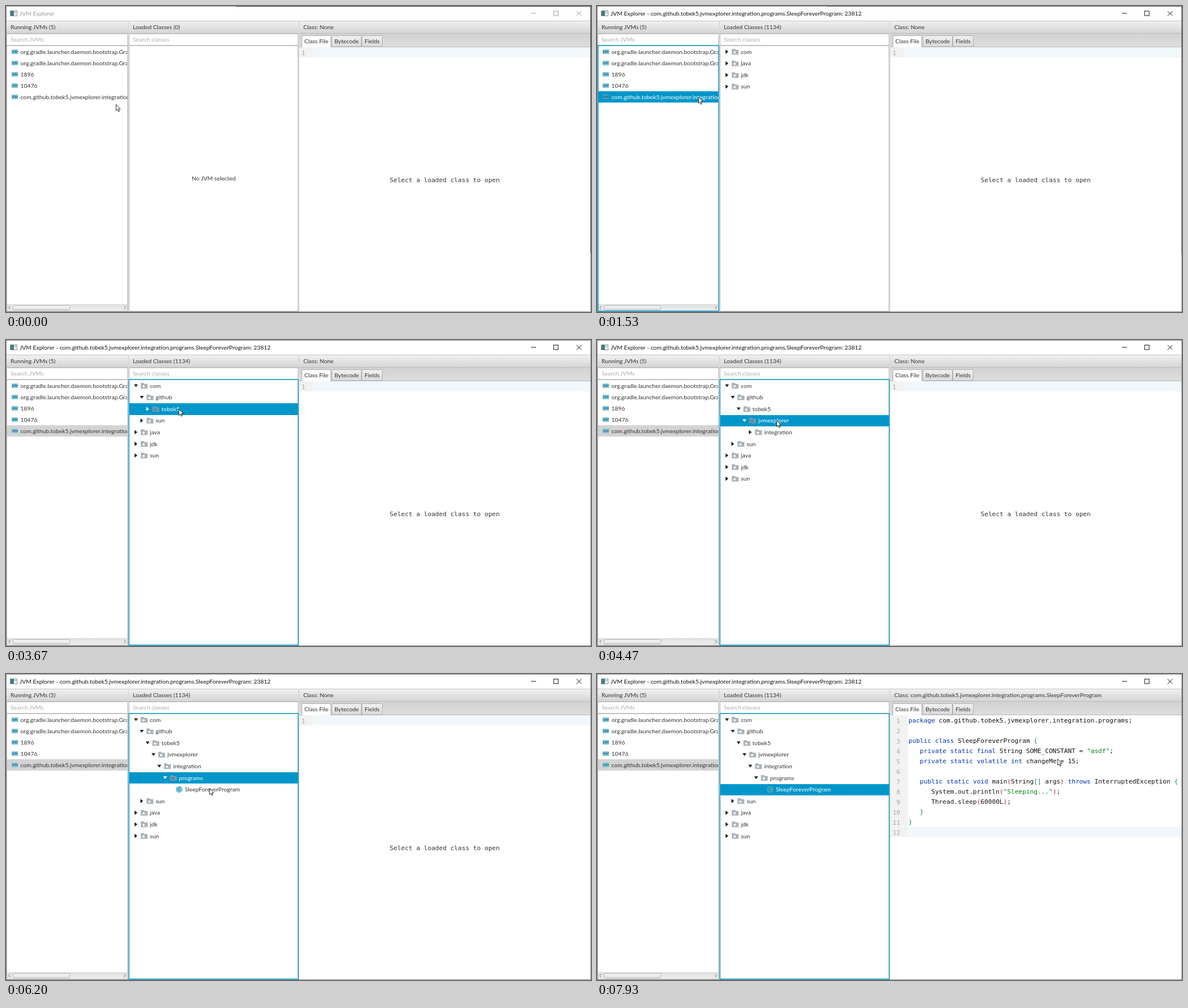
Write an HTML page with a canvas that moves like this. It is 1033 by 542 pixels and loops after 8000 ms.

```html
<!DOCTYPE html>
<html lang="en">
<head>
<meta charset="utf-8">
<title>JVM Explorer</title>
<style>
html, body { margin: 0; width: 100%; height: 100%; overflow: hidden; background: #fff; }
canvas { display: block; width: 1033px; height: 542px; }
</style>
</head>
<body>
<canvas id="stage"></canvas>
<script>
const W = 1033, H = 542, LOOP = 8000;
const canvas = document.getElementById('stage');
const ratio = window.devicePixelRatio || 1;
canvas.width = Math.round(W * ratio);
canvas.height = Math.round(H * ratio);
const ctx = canvas.getContext('2d');

const UI = '10.35px Lato, "Open Sans", sans-serif';
const MONO = '11.13px "DejaVu Sans Mono", "Noto Sans Mono", monospace';
const CHAR = 6.702;
const INK = '#333', ACCENT = '#0096c9', FOCUS = '#039ed3';

const PATH = ['com', 'github', 'tobek5', 'jvmexplorer', 'integration', 'programs', 'SleepForeverProgram'];
const CLASS = PATH.join('.');
const JVMS = [
  'org.gradle.launcher.daemon.bootstrap.GradleDaemon',
  'org.gradle.launcher.daemon.bootstrap.GradleDaemon',
  '1896', '10476', CLASS
];
const CODE = `package ${PATH.slice(0, 6).join('.')};

public class SleepForeverProgram {
   private static final String SOME_CONSTANT = "asdf";
   private static volatile int changeMe = 15;

   public static void main(String[] args) throws InterruptedException {
      System.out.println("Sleeping...");
      Thread.sleep(60000L);
   }
}
`.split('\n');
const TOKEN = /"[^"]*"|\b(?:package|public|class|private|static|final|volatile|int|void|throws)\b|[(){}[\]]/g;

const OPEN_AT = [2530, 3270, 3930, 4470, 5270, 6000];
const SELECT_AT = [2330, 3070, 3670, 4330, 5000, 5730, 6730];
const ACTIVE_AT = 600, TITLE_AT = 800, LOADED_AT = 1130, CODE_AT = 6930;

// start, end, number of steps, then the points passed on the way
const MOVES = [
  [130, 330, 4, [194, 174], [186, 178], [165, 160]],
  [1130, 1530, 7, [165, 160], [179, 161]],
  [1870, 2130, 5, [179, 161], [276, 82]],
  [2530, 2730, 4, [276, 82], [286, 102]],
  [3270, 3470, 4, [286, 102], [305, 122]],
  [4070, 4130, 2, [305, 122], [315, 140]],
  [4470, 4730, 5, [315, 140], [331, 164]],
  [5270, 5530, 4, [331, 164], [366, 177]],
  [6000, 6200, 4, [366, 177], [359, 202]],
  [6930, 7730, 13, [359, 202], [741, 161]],
  [7800, 7930, 3, [741, 161], [813, 150]]
];

const countPast = (times, t) => times.filter(v => t >= v).length;

function rect(x, y, w, h, fill) {
  ctx.fillStyle = fill;
  ctx.fillRect(x, y, w, h);
}

function frame(x, y, w, h, color, width = 1) {
  ctx.strokeStyle = color;
  ctx.lineWidth = width;
  ctx.strokeRect(x + width / 2, y + width / 2, w - width, h - width);
}

function shape(points, fill, stroke) {
  ctx.beginPath();
  points.forEach(([x, y]) => ctx.lineTo(x, y));
  ctx.closePath();
  if (fill) { ctx.fillStyle = fill; ctx.fill(); }
  if (stroke) { ctx.strokeStyle = stroke; ctx.stroke(); }
}

function line(color, ...points) {
  ctx.strokeStyle = color;
  ctx.lineWidth = 1;
  ctx.beginPath();
  points.forEach(([x, y], i) => i ? ctx.lineTo(x, y) : ctx.moveTo(x, y));
  ctx.stroke();
}

function pill(x, y, w, h, r, fill, stroke) {
  ctx.beginPath();
  ctx.roundRect(x, y, w, h, r);
  ctx.fillStyle = fill;
  ctx.fill();
  if (stroke) { ctx.strokeStyle = stroke; ctx.lineWidth = 1; ctx.stroke(); }
}

function text(str, x, y, color = INK, font = UI, align = 'left') {
  ctx.font = font;
  ctx.fillStyle = color;
  ctx.textAlign = align;
  ctx.fillText(str, x, y);
}

function shade(y0, y1, top, bottom) {
  const g = ctx.createLinearGradient(0, y0, 0, y1);
  g.addColorStop(0, top);
  g.addColorStop(1, bottom);
  return g;
}

function clipped(x, y, w, h, draw) {
  ctx.save();
  ctx.beginPath();
  ctx.rect(x, y, w, h);
  ctx.clip();
  draw();
  ctx.restore();
}

function titleBar(t) {
  const active = t >= ACTIVE_AT, ink = active ? '#111' : '#999';
  rect(0, 0, W, 26, '#fff');
  rect(7, 8, 13, 10, '#8a8f94');
  rect(8, 9, 11, 8, '#f4f6f7');
  rect(8, 9, 6, 8, '#3c7f83');
  rect(15, 10, 3, 3, '#b9c3c8');
  text('JVM Explorer' + (t >= TITLE_AT ? ` - ${CLASS}: 23812` : ''), 24, 17, ink);
  line(ink, [927, 13], [936, 13]);
  frame(966.5, 8.5, 9, 9, ink);
  line(ink, [1007.5, 9], [1016, 17.5]);
  line(ink, [1016, 9], [1007.5, 17.5]);
}

function header(x, w, label) {
  rect(x, 26, w, 23, shade(26, 48, '#f1f1f1', '#d5d5d5'));
  rect(x, 26, w, 1, '#c4c4c4');
  rect(x, 48, w, 1, '#bcbcbc');
  text(label, x + 7, 40.7);
}

function search(x, w, hint) {
  rect(x, 49, w, 21, '#fff');
  frame(x, 49, w, 21, '#c6c6c6');
  text(hint, x + 7, 63.3, '#acacac');
}

function listBox(x, w) {
  rect(x, 70, w, 471, '#fff');
  frame(x, 70, w, 471, '#bdbdbd');
}

function focusRing(x, w) {
  frame(x - .7, 69.3, w + 1.4, 471.7, FOCUS, 1.4);
}

function selectedRow(x, y, w, h) {
  rect(x, y, w, h, FOCUS);
  rect(x + 1, y + 1, w - 2, h - 2, ACCENT);
}

function jvmList(t) {
  const focused = t >= ACTIVE_AT && t < SELECT_AT[0];
  header(1, 214, 'Running JVMs (5)');
  search(1, 214, 'Search JVMs');
  listBox(1, 214);
  clipped(2, 71, 212, 457, () => JVMS.forEach((name, i) => {
    const y = 81 + i * 20, chosen = i === 4 && t >= ACTIVE_AT;
    if (chosen && focused) selectedRow(2, y - 10, 212, 20);
    else if (chosen) rect(2, y - 10, 212, 20, '#d3d3d3');
    rect(10, y - 4, 11, 8, chosen && focused ? '#3fa3c4' : '#79c7de');
    text('JVM', 15.5, y + 2, '#2d5968', 'bold 5px Lato, sans-serif', 'center');
    text(name, 25.5, y + 3.7, chosen && focused ? '#fff' : INK);
  }));
  rect(2, 528, 212, 12, shade(528, 540, '#dedede', '#efefef'));
  pill(12.5, 530.5, 100, 8, 2, shade(530, 539, '#fafafa', '#dcdcdc'), '#b2b2b2');
  line('#666', [7.5, 531.5], [4.5, 534.5], [7.5, 537.5]);
  line('#666', [208.5, 531.5], [211.5, 534.5], [208.5, 537.5]);
  if (focused) focusRing(2, 213);
}

function treeRows(open) {
  const rows = PATH.slice(0, open + 1).map((name, depth) =>
    ({ name, depth, open: depth < open, leaf: depth === PATH.length - 1 }));
  if (open) rows.push({ name: 'sun', depth: 1 });
  return rows.concat(['java', 'jdk', 'sun'].map(name => ({ name, depth: 0 })));
}

function folder(x, y, chosen) {
  const color = chosen ? '#6c9aae' : '#a9b3ba';
  shape([[x, y - 5], [x + 5, y - 5], [x + 6.5, y - 3.2], [x + 12, y - 3.2], [x + 12, y + 5], [x, y + 5]], color);
  ctx.beginPath();
  ctx.arc(x + 5, y + 1, 2, 0, 7);
  ctx.fillStyle = chosen ? '#3c87a6' : '#fff';
  ctx.fill();
}

function classTree(t) {
  const loaded = t >= LOADED_AT, picked = countPast(SELECT_AT, t) - 1;
  header(217, 299, `Loaded Classes (${loaded ? 1134 : 0})`);
  search(217, 299, 'Search classes');
  listBox(217, 299);
  if (!loaded) {
    text('No JVM selected', 366.7, 309.3, INK, UI, 'center');
    return;
  }
  treeRows(countPast(OPEN_AT, t)).forEach((row, i) => {
    const y = 81 + i * 20.58, dx = row.depth * 10.3, chosen = i === picked;
    const ink = chosen ? '#fff' : INK;
    if (chosen) {
      const top = Math.round(y - 9.9);
      selectedRow(218, top, 298, Math.round(y + 10.4) - top);
    }
    if (row.leaf) {
      ctx.beginPath();
      ctx.arc(244 + dx, y, 6, 0, 7);
      ctx.fillStyle = chosen ? '#3fa3c4' : '#79c7de';
      ctx.fill();
      text('C', 244 + dx, y + 2.8, '#35616f', '8px Lato, sans-serif', 'center');
    } else {
      const x = 227 + dx;
      shape(row.open
        ? [[x - 1, y - 2.6], [x + 6, y - 2.6], [x + 2.5, y + 2.4]]
        : [[x, y - 3.8], [x + 5, y], [x, y + 3.8]], chosen ? '#fff' : '#222');
      folder(238 + dx, y, chosen);
    }
    text(row.name, 254 + dx, y + 3.7, ink);
  });
  if (picked >= 0) focusRing(217, 299);
}

function tab(x, w, label, active) {
  const fill = active ? '#fdfdfd' : shade(53, 72, '#f0f0f0', '#dadada');
  pill(x + .5, 52.5, w, active ? 21 : 19.5, [2, 2, 0, 0], fill, '#b0b0b0');
  text(label, x + w / 2 + .5, 66, INK, UI, 'center');
}

function codeLine(str, x, y) {
  const put = (part, at, color) => text(part, x + at * CHAR, y, color, MONO);
  let last = 0;
  for (const m of str.matchAll(TOKEN)) {
    const tok = m[0];
    put(str.slice(last, m.index), last, '#111');
    const color = tok[0] === '"' ? '#067d17'
      : /[()]/.test(tok) ? '#b22222'
      : /[{}[\]]/.test(tok) ? '#148080' : '#0033b3';
    put(tok, m.index, color);
    last = m.index + tok.length;
  }
  put(str.slice(last), last, '#111');
}

function classView(t) {
  const shown = t >= CODE_AT, chosen = t >= SELECT_AT[6];
  const lines = shown ? CODE : [''];
  const gutter = shown ? 549 : 542;
  header(518, 514, 'Class: ' + (chosen ? CLASS : 'None'));
  rect(518, 49, 514, 24, shade(49, 73, '#d2d2d2', '#dedede'));
  rect(518, 72, 514, 1, '#b8b8b8');
  tab(575, 52, 'Bytecode');
  tab(628, 36, 'Fields');
  tab(522, 51, 'Class File', true);
  rect(518, 73, 514, 468, '#fff');
  lines.forEach((str, i) => {
    const top = 73 + i * 18;
    rect(518, top, gutter - 518, 18, '#f2f2f2');
    if (i === lines.length - 1) rect(gutter, top, 1032 - gutter, 18, '#f0f8fb');
    text(String(i + 1), gutter - 13.6, top + 13.5, '#a8a8a8', MONO, 'right');
    codeLine(str, 550, top + 13.2);
  });
  if (!chosen) text('Select a loaded class to open', 677.5, 312, INK, MONO);
}

function windowEdge(t) {
  frame(0, 0, W, H, '#8c8c8c');
  if (t < 2930) {
    const color = t < ACTIVE_AT ? '#2b2b2b' : '#555';
    rect(406, 0, 627, 1, color);
    rect(1032, 0, 1, 438, color);
  }
}

function along(points, p) {
  const at = p * (points.length - 1);
  const i = Math.min(Math.floor(at), points.length - 2), f = at - i;
  return points[i].map((v, k) => v + (points[i + 1][k] - v) * f);
}

function pointerAt(t) {
  let pos = MOVES[0][3];
  for (const [start, end, steps, ...points] of MOVES) {
    if (t < start) break;
    const step = (end - start) / (steps - 1);
    const p = t >= end ? 1 : (Math.floor((t - start) / step) + 1) / steps;
    pos = along(points, p * p * (3 - 2 * p));
  }
  return pos;
}

function pointer(t) {
  const [x, y] = pointerAt(t);
  ctx.save();
  ctx.translate(Math.round(x) + .3, Math.round(y) + .5);
  ctx.lineWidth = 0.9;
  shape([[0, 0], [0, 11], [2.5, 8.6], [4.3, 12.6], [6, 11.9], [4.3, 8], [7.6, 7.8]], '#fff', '#111');
  ctx.restore();
}

function draw(t) {
  ctx.setTransform(ratio, 0, 0, ratio, 0, 0);
  rect(0, 0, W, H, '#d9d9d9');
  titleBar(t);
  jvmList(t);
  classTree(t);
  classView(t);
  windowEdge(t);
  pointer(t);
}

const begin = performance.now();
function tick() {
  draw((performance.now() - begin) % LOOP);
  requestAnimationFrame(tick);
}
tick();
</script>
</body>
</html>
```
